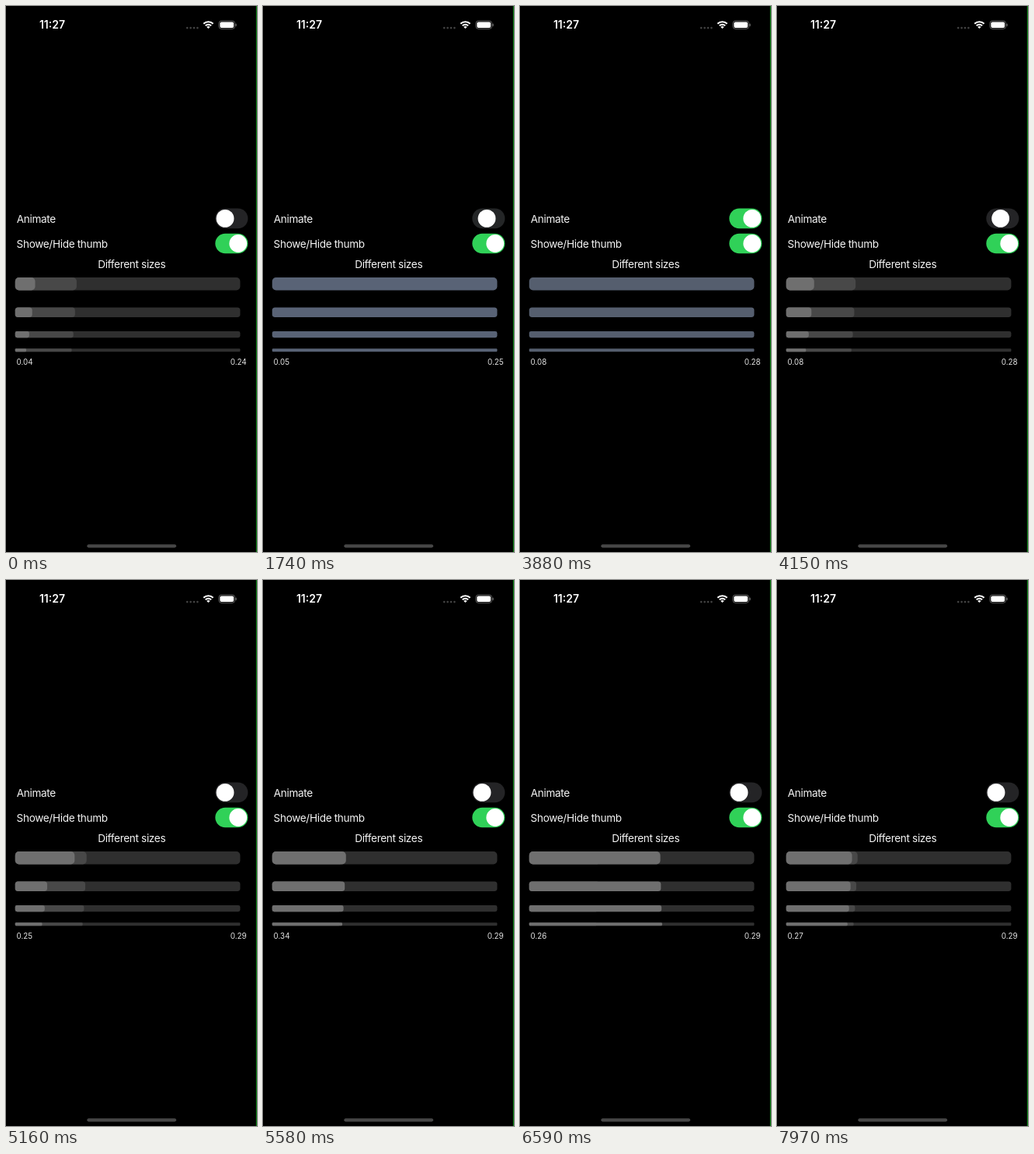
An HTML page with a canvas that plays this animation: 323 by 700 pixels, repeating every 8 s.

```html
<!DOCTYPE html>
<html lang="en">
<head>
<meta charset="utf-8">
<title>Progress bars</title>
<style>
  html, body { margin: 0; width: 100%; height: 100%; overflow: hidden; background: #000; }
  canvas { display: block; width: 323px; height: 700px; }
</style>
</head>
<body>
<canvas id="stage"></canvas>
<script>
const W = 323, H = 700, LOOP = 8000;
const canvas = document.getElementById('stage');
const ctx = canvas.getContext('2d');
const dpr = window.devicePixelRatio || 1;
canvas.width = W * dpr;
canvas.height = H * dpr;

const BAR = { x: 11.8, w: 289.6 };
const BARS = [
  { y: 348, h: 16.5 },
  { y: 386.5, h: 12.4 },
  { y: 417, h: 8.3 },
  { y: 439.2, h: 4.1 }
];
const TICKS = [870, 1880, 2880, 3880, 4890];
const LATE_TICKS = [6970, 7970];
const ON_AT = 1670, OFF_AT = 4010, DRAG_AT = 5160;
const LAG = 350;
// Finger path: time, value
const DRAG = [[5075, .233], [5650, .36], [6000, .76], [6240, .925], [6590, .262], [6640, .246]];

const clamp = v => Math.min(1, Math.max(0, v));
const smooth = v => { v = clamp(v); return v * v * (3 - 2 * v); };
const mix = (a, b, p) => a + (b - a) * p;
const mixRgb = (a, b, p) => `rgb(${a.map((c, i) => Math.round(mix(c, b[i], p)))})`;
const passed = (list, t) => list.filter(at => t >= at).length;

// Motion advances in short held steps
function step(t) {
  const hold = from => from + Math.floor((t - from) / 70) * 70;
  if (t >= 6870) return t < 6970 ? 6870 : t;
  if (t >= 6590) return hold(6590);
  if (t >= DRAG_AT) return Math.min(6490, hold(DRAG_AT));
  if (t >= OFF_AT) return hold(OFF_AT);
  if (t >= ON_AT && t < 1880) return hold(ON_AT);
  return t;
}

function dragValue(t, before) {
  if (t < DRAG[0][0]) return before;
  for (let i = 1; i < DRAG.length; i++) {
    const [t0, v0] = DRAG[i - 1], [t1, v1] = DRAG[i];
    if (t < t1) return mix(v0, v1, (t - t0) / (t1 - t0));
  }
  return DRAG[DRAG.length - 1][1];
}

// Bars trail the finger: weighted mean of its recent path
function trailing(t, before) {
  const n = 70;
  let sum = 0, total = 0;
  for (let i = 0; i < n; i++) {
    const u = (i + .5) / n, weight = u * (1 - u);
    sum += weight * dragValue(t - u * LAG, before);
    total += weight;
  }
  return sum / total;
}

function stateAt(t) {
  const ticks = passed(TICKS, t);
  const extra = passed(LATE_TICKS, t) * .01;
  const idle = .036 + ticks * .01;
  const dragged = t >= DRAG_AT;
  return {
    value: dragged ? dragValue(t, idle) + extra : idle,
    buffer: .244 + ticks * .01,
    fills: BARS.map((b, i) => dragged ? trailing(t, i ? idle : .233) + extra : idle),
    toggle: t < OFF_AT ? smooth((t - 1645) / 235) : 1 - smooth((t - 3985) / 270),
    busy: t >= ON_AT && t < OFF_AT,
    busyColor: t < 1880 ? '#596376' : '#555e6e'
  };
}

function box(x, y, w, h, r, color) {
  ctx.fillStyle = color;
  ctx.beginPath();
  ctx.roundRect(x, y, w, h, r);
  ctx.fill();
}

function disc(x, y, r, color) {
  ctx.fillStyle = color;
  ctx.beginPath();
  ctx.arc(x, y, r, 0, Math.PI * 2);
  ctx.fill();
}

function label(str, x, y, size, { align = 'left', weight = 400, spacing = 0, color = '#f4f4f4' } = {}) {
  ctx.font = `${weight} ${size}px Inter, Roboto, sans-serif`;
  ctx.letterSpacing = spacing + 'px';
  ctx.textAlign = align;
  ctx.textBaseline = 'alphabetic';
  ctx.fillStyle = color;
  ctx.fillText(str, x, y);
}

function drawStatus() {
  label('11:27', 59.5, 29.2, 14, { align: 'center', weight: 600, color: '#fff' });
  for (let i = 0; i < 4; i++) disc(233.2 + i * 4.4, 28.1, 1.3, '#434343');

  ctx.strokeStyle = '#fff';
  ctx.lineWidth = 2.1;
  const cx = 260.4, cy = 29;
  for (const r of [8.7, 5.2]) {
    ctx.beginPath();
    ctx.arc(cx, cy, r, -Math.PI * .75, -Math.PI * .25);
    ctx.stroke();
  }
  ctx.fillStyle = '#fff';
  ctx.beginPath();
  ctx.moveTo(cx, cy);
  ctx.arc(cx, cy, 3, -Math.PI * .75, -Math.PI * .25);
  ctx.fill();

  ctx.strokeStyle = '#6a6a6a';
  ctx.lineWidth = .9;
  ctx.beginPath();
  ctx.roundRect(273.9, 19.1, 20.6, 10.2, 3.2);
  ctx.stroke();
  box(275.3, 20.5, 17.8, 7.4, 2, '#fff');
  box(295.5, 22.6, 1.2, 3.4, .6, '#6a6a6a');
}

function drawToggle(y, p) {
  box(269.3, y - 12.8, 42, 25.6, 12.8, mixRgb([36, 36, 38], [48, 209, 88], clamp((p - .35) / .65)));
  disc(mix(282, 298.7, p), y, 11.4, '#fff');
}

function drawBars(s) {
  BARS.forEach(({ y, h }, i) => {
    const r = h * .3;
    const fill = (v, color) => box(BAR.x, y, h + v * (BAR.w - 2 * h), h, r, color);
    box(BAR.x, y, BAR.w, h, r, s.busy ? s.busyColor : '#2f2f2f');
    if (s.busy) return;
    fill(s.buffer, '#484848');
    fill(s.fills[i], '#6f6f6f');
  });
}

function draw(time) {
  const s = stateAt(step(time));
  ctx.setTransform(dpr, 0, 0, dpr, 0, 0);
  ctx.fillStyle = '#000';
  ctx.fillRect(0, 0, W, H);

  drawStatus();
  const body = { spacing: -.34 };
  label('Animate', 13.8, 277.5, 13.6, body);
  label('Showe/Hide thumb', 13.6, 309.5, 13.6, body);
  label('Different sizes', 161.7, 336, 13.6, { ...body, align: 'center' });
  drawToggle(272.4, s.toggle);
  drawToggle(304.5, 1);
  drawBars(s);
  label(s.value.toFixed(2), 13.6, 460, 9.8, { color: '#e4e4e4' });
  label(s.buffer.toFixed(2), 309.6, 460, 9.8, { align: 'right', color: '#e4e4e4' });

  box(104.3, 690.2, 114.8, 4.2, 2.1, '#474747');
  ctx.fillStyle = '#14851c';
  ctx.fillRect(321.8, 0, 1.2, H);
}

function loop() {
  draw(performance.now() % LOOP);
  requestAnimationFrame(loop);
}
loop();
</script>
</body>
</html>
```
